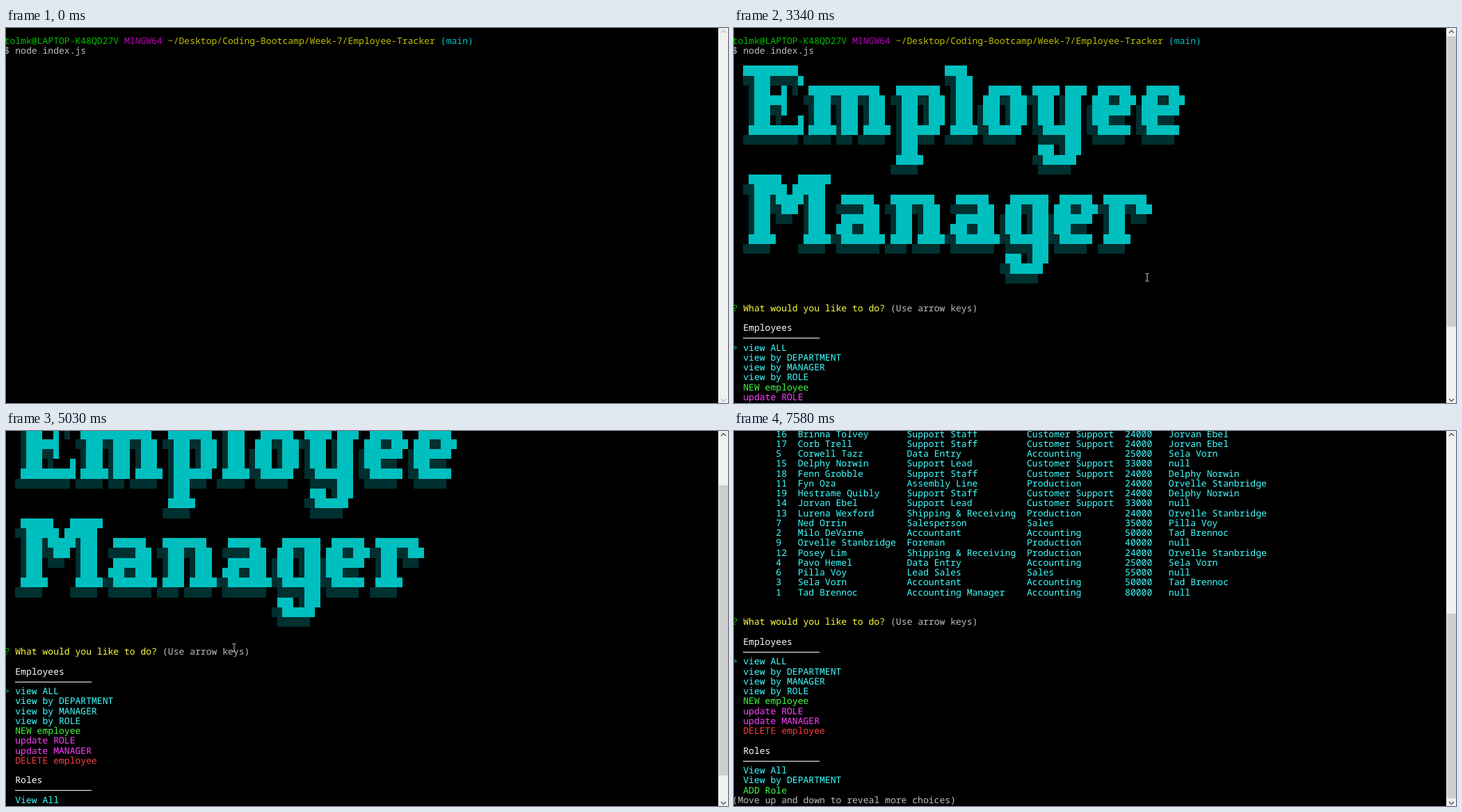
Write an HTML page that moves like this. It is 1038x540 px and loops after 8 s.

```html
<!DOCTYPE html>
<html lang="en">
<head>
<meta charset="utf-8">
<title>Employee Tracker terminal</title>
<style>
html, body { margin: 0; width: 100%; height: 100%; overflow: hidden; background: #000; }
svg { display: block; width: 100%; height: 100%; }
text { font: 13.07px "Noto Sans Mono", "DejaVu Sans Mono", monospace; text-rendering: geometricPrecision; }
</style>
</head>
<body>
<svg id="stage" viewBox="0 0 1038 540"></svg>
<script>
const stage = document.getElementById('stage');
const LOOP = 8000, PAGE = 17;
const CW = 7.84, LH = 14.25;
const C = {
  green: '#00bf00', magenta: '#bf00bf', yellow: '#bfbf00', cyan: '#00bfbf', gray: '#bfbfbf',
  hiGreen: '#40ff40', hiMagenta: '#ff40ff', hiYellow: '#ffff40', hiCyan: '#40ffff', hiRed: '#ff4040',
  white: '#ffffff', shade: '#003030'
};

const colX = c => c * CW - 2.4;
const rowY = r => 11.6 + r * LH;
const put = (row, col, str, color) =>
  `<text x="${colX(col).toFixed(2)}" y="${(rowY(row) + 11.2).toFixed(2)}" fill="${color}">${str}</text>`;
const box = (x, y, w, h, fill) =>
  `<rect x="${x}" y="${y}" width="${w}" height="${h}" fill="${fill}" shape-rendering="crispEdges"/>`;

// Banner lettering, rows split by "/"
const FONT = {
  E: ' ██████████/░░███░░░░░█/ ░███  █ ░/ ░██████/ ░███░░█/ ░███ ░   █/ ██████████/░░░░░░░░░░',
  M: ' ██████   ██████/░░██████ ██████/ ░███░█████░███/ ░███░░███ ░███/ ░███ ░░░  ░███/ ░███      ░███/ █████     █████/░░░░░     ░░░░░',
  a: '//  ██████/ ░░░░░███/  ███████/ ███░░███/░░████████/ ░░░░░░░░',
  e: '//  ██████/ ███░░███/░███████/░███░░░/░░██████/ ░░░░░░',
  g: '//  ███████/ ███░░███/░███ ░███/░███ ░███/░░███████/ ░░░░░███/ ███ ░███/░░██████/ ░░░░░░',
  l: ' ████/░░███/ ░███/ ░███/ ░███/ ░███/ █████/░░░░░',
  m: '// █████████████/░░███░░███░░███/ ░███ ░███ ░███/ ░███ ░███ ░███/ █████░███ █████/░░░░░ ░░░ ░░░░░',
  n: '// ████████/░░███░░███/ ░███ ░███/ ░███ ░███/ ████ █████/░░░░ ░░░░░',
  o: '//  ██████/ ███░░███/░███ ░███/░███ ░███/░░██████/ ░░░░░░',
  p: '// ████████/░░███░░███/ ░███ ░███/ ░███ ░███/ ░███████/ ░███░░░/ ░███/ █████/░░░░░',
  r: '// ████████/░░███░░███/ ░███ ░░░/ ░███/ █████/░░░░░',
  y: '// █████ ████/░░███ ░███/ ░███ ░███/ ░███ ░███/ ░░███████/  ░░░░░███/  ███ ░███/ ░░██████/  ░░░░░░'
};

function letter(word) {
  const out = Array(11).fill('');
  for (const ch of word) {
    const rows = FONT[ch].split('/');
    const width = Math.max(...rows.map(r => r.length));
    out.forEach((s, i) => { out[i] = s + (rows[i] || '').padEnd(width); });
  }
  return out;
}
const banner = [...letter('Employee'), ...letter('Manager')];
banner[0] = banner[0].slice(1); // the printed text is trimmed

function drawBanner(top) {
  let svg = '';
  banner.forEach((line, i) => {
    const y = Math.round(rowY(top + i)), h = Math.round(rowY(top + i + 1)) - y;
    for (const m of line.matchAll(/█+|░+/g)) {
      const x = colX(2 + m.index);
      svg += box(x, y, m[0].length * CW, h, m[0][0] === '█' ? C.cyan : C.shade);
    }
  });
  return svg;
}

const RULE = '-';
const menu = [
  [''], ['Employees', C.white], [RULE],
  ['view ALL', C.hiCyan], ['view by DEPARTMENT', C.hiCyan], ['view by MANAGER', C.hiCyan], ['view by ROLE', C.hiCyan],
  ['NEW employee', C.hiGreen], ['update ROLE', C.hiMagenta], ['update MANAGER', C.hiMagenta], ['DELETE employee', C.hiRed],
  [''], ['Roles', C.white], [RULE],
  ['View All', C.hiCyan], ['View by DEPARTMENT', C.hiCyan], ['ADD Role', C.hiGreen],
  ['update DEPARTMENT', C.hiMagenta], ['update SALARY', C.hiMagenta], ['DELETE Role', C.hiRed]
];

function drawMenu(top, s) {
  let svg = put(top, 0, '?', C.green) + put(top, 2, 'What would you like to do?', C.hiYellow);
  if (s.hint) svg += put(top, 29, '(Use arrow keys)', C.gray);
  menu.slice(s.page, s.page + PAGE).forEach(([label, color], i) => {
    const row = top + 1 + i;
    if (label === RULE) svg += box(colX(2), Math.round(rowY(row) + 7), 14 * CW, 1, C.white);
    else if (label) svg += put(row, 2, label, color);
  });
  return svg + put(top + 4 + s.sel, 0, '&gt;', C.cyan) +
    put(top + 1 + PAGE, 0, '(Move up and down to reveal more choices)', C.gray);
}

const staff = `16|Brinna Tolvey|Support Staff|Customer Support|24000|Jorvan Ebel
17|Corb Trell|Support Staff|Customer Support|24000|Jorvan Ebel
5|Corwell Tazz|Data Entry|Accounting|25000|Sela Vorn
15|Delphy Norwin|Support Lead|Customer Support|33000|null
18|Fenn Grobble|Support Staff|Customer Support|24000|Delphy Norwin
11|Fyn Oza|Assembly Line|Production|24000|Orvelle Stanbridge
19|Hestrame Quibly|Support Staff|Customer Support|24000|Delphy Norwin
14|Jorvan Ebel|Support Lead|Customer Support|33000|null
13|Lurena Wexford|Shipping &amp; Receiving|Production|24000|Orvelle Stanbridge
7|Ned Orrin|Salesperson|Sales|35000|Pilla Voy
2|Milo DeVarne|Accountant|Accounting|50000|Tad Brennoc
9|Orvelle Stanbridge|Foreman|Production|40000|null
12|Posey Lim|Shipping &amp; Receiving|Production|24000|Orvelle Stanbridge
4|Pavo Hemel|Data Entry|Accounting|25000|Sela Vorn
6|Pilla Voy|Lead Sales|Sales|55000|null
3|Sela Vorn|Accountant|Accounting|50000|Tad Brennoc
1|Tad Brennoc|Accounting Manager|Accounting|80000|null`.split('\n').map(r => r.split('|'));
const TABS = [8, 12, 32, 54, 72, 80];

const drawTable = top => staff.map((cells, i) =>
  cells.map((cell, j) => put(top + i, TABS[j], cell, C.hiCyan)).join('')).join('');

const drawPrompt = row =>
  put(row, 0, 'tolmk@LAPTOP-K48QD27V', C.green) + put(row, 22, 'MINGW64', C.magenta) +
  put(row, 30, '~/Desktop/Coding-Bootcamp/Week-7/Employee-Tracker', C.yellow) +
  put(row, 80, '(main)', C.cyan) + put(row + 1, 0, '$ node index.js', C.gray);

function drawBar(s) {
  const ink = s.menu ? '#505050' : '#bdbdbd';
  let svg = box(1024, 0, 14, 540, '#f0f0f0');
  if (s.table) svg += box(1025, 263, 13, 266, '#cdcdcd');
  else if (s.menu) svg += box(1025, 12 + s.scroll * 11, 13, 418, '#cdcdcd');
  return svg + `<path d="M1028 7l3.5-3.5 3.5 3.5M1028 534l3.5 3.5 3.5-3.5" fill="none" stroke="${ink}" stroke-width="1.3"/>`;
}

function drawPointer(s) {
  if (!s.at) return '';
  const [x, y] = s.at;
  const halo = s.click ? `<ellipse cx="${x - 2}" cy="${y - .5}" rx="11" ry="10.5" fill="#ffff00" opacity=".5"/>` : '';
  return halo + `<path transform="translate(${x} ${y})" d="M-2.5-5.5H-.5M.5-5.5H2.5M0-5V5M-2.5 5.5H-.5M.5 5.5H2.5" stroke="#d0d0d0" fill="none"/>`;
}

function draw(s) {
  let svg = '';
  if (s.table) {
    svg = drawTable(-1) + drawMenu(18, s);
  } else {
    svg = drawPrompt(-s.scroll);
    if (s.title) svg += drawBanner(3 - s.scroll);
    if (s.menu) svg += drawMenu(27 - s.scroll, s);
  }
  stage.innerHTML = box(0, 0, 1038, 540, '#000') + svg + drawBar(s) + drawPointer(s);
}

// Each step changes part of the state and keeps the rest
let state = { scroll: 0, sel: 0, page: 0, hint: true, at: null };
const steps = [
  [0, {}],
  [320, { at: [826, 424] }],
  [430, { at: [730, 361] }],
  [660, { click: true }],
  [760, { click: false }],
  [1650, { at: null }],
  [2220, { title: true }],
  [2320, { menu: true }],
  [3340, { at: [594, 359] }],
  [3440, { at: [530, 338] }],
  [3560, { at: [440, 314] }],
  [3670, { at: [375, 306] }],
  [3780, { at: [336, 308] }],
  [3900, { at: [328, 312] }],
  [4350, { scroll: 1 }],
  [4470, { scroll: 3 }],
  [4580, { scroll: 4 }],
  [5030, { scroll: 6 }],
  [5810, { scroll: 9, sel: 1, hint: false, at: null }],
  [6240, { sel: 2 }],
  [6800, { page: 2 }],
  [7020, { page: 3 }],
  [7580, { table: true, sel: 0, page: 0, hint: true }]
].map(([time, change]) => [time, state = { ...state, ...change }]);

let shown = -1;
const start = performance.now();
function tick() {
  const t = (performance.now() - start) % LOOP;
  const now = steps.findLastIndex(([time]) => time <= t);
  if (now !== shown) draw(steps[shown = now][1]);
  requestAnimationFrame(tick);
}
tick();
</script>
</body>
</html>
```
